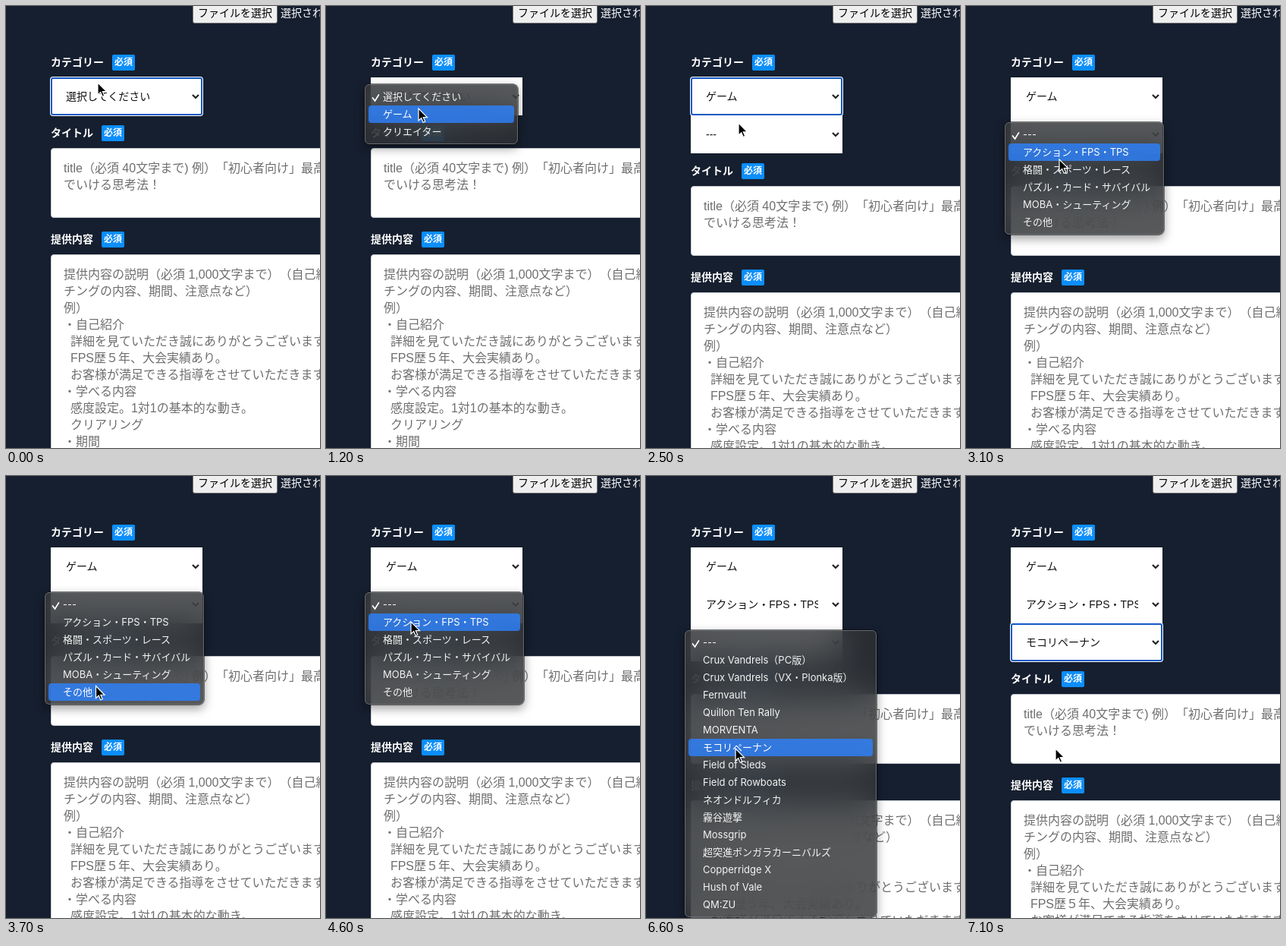
Recreate the animation shown at these times as an HTML page. Size 414 by 582 pixels, loop 7200 ms.

```html
<!DOCTYPE html>
<html lang="ja">
<head>
<meta charset="utf-8">
<style>
html, body { margin: 0; width: 100%; height: 100%; overflow: hidden; background: #161f2f; }
#stage {
  position: relative; width: 414px; height: 582px; overflow: hidden; background: #161f2f;
  font: 14px/20px 'Liberation Sans', 'Noto Sans CJK JP', sans-serif; text-spacing-trim: space-all;
}
#stage * { box-sizing: border-box; white-space: pre; }
#stage > *, #lower > * { position: absolute; }
.file { left: 246px; top: -5px; width: 112px; height: 28px; padding-top: 3px; text-align: center;
  background: #efefef; border: 1px solid #767676; border-radius: 3px; color: #000; }
.status { left: 362px; top: -1px; color: #fff; }
.label { left: 59px; color: #fff; font-weight: bold; }
.label b { display: inline-block; width: 30px; height: 21px; margin-left: 11px; vertical-align: top;
  background: #0c8efb; border-radius: 2px; font-size: 12px; line-height: 21px; text-align: center; }
.select { left: 59px; width: 200px; height: 50px; padding: 15px 0 0 20px; background: #fff; color: #111; }
.select span { display: block; width: 148px; overflow: hidden; }
.select svg { position: absolute; left: 185px; top: 21px; }
.focus { border-radius: 3px; box-shadow: 0 0 0 1px #fff, inset 0 0 0 2px #1259c3; }
#lower { left: 0; top: 0; }
.area { left: 59px; width: 420px; padding: 15px 16px; background: #fff; border: 1px solid #c6cbd1;
  border-radius: 4px; color: #6e6e6e; font-size: 16px; line-height: 22px; }
.menu { left: 51px; padding: 4px; border: 1px solid #686b70; border-radius: 6px; color: #f4f4f4;
  background: rgba(46, 48, 50, .8); backdrop-filter: blur(24px);
  box-shadow: 0 0 0 .5px #000, 0 5px 14px rgba(0, 0, 0, .4);
  font: 13px/23px Inter, 'Noto Sans CJK JP', sans-serif; }
.menu div { height: 23px; padding-left: 19px; border-radius: 4px; overflow: hidden; }
.menu .on { background: rgba(46, 126, 245, .85); color: #fff; }
.menu svg { position: absolute; left: 8px; top: 11px; }
#cursor { left: 0; top: 0; overflow: visible; }
</style>
</head>
<body>
<div id="stage">
  <div class="file">ファイルを選択</div>
  <div class="status">選択されていません</div>
  <div class="label" style="top:64px">カテゴリー<b>必須</b></div>
  <div id="lower">
    <div class="label" style="top:157px">タイトル<b>必須</b></div>
    <div class="area" style="top:187px;height:92px">title（必須 40文字まで) 例）「初心者向け」最高
でいける思考法！</div>
    <div class="label" style="top:297px">提供内容<b>必須</b></div>
    <div class="area" style="top:327px;height:400px">提供内容の説明（必須 1,000文字まで）（自己紹介
チングの内容、期間、注意点など）
例）
・自己紹介
  詳細を見ていただき誠にありがとうございます
  FPS歴５年、大会実績あり。
  お客様が満足できる指導をさせていただきます
・学べる内容
  感度設定。1対1の基本的な動き。
  クリアリング
・期間</div>
  </div>
</div>
<script>
const LOOP = 7200, ROW = 23;
const stage = document.getElementById('stage'), lower = document.getElementById('lower');

// open/close: menu visibility; shown: when the select joins the form
const fields = [
  { shown: 0, open: 500, close: 2200, width: 202, pick: 1,
    items: ['選択してください', 'ゲーム', 'クリエイター'] },
  { shown: 2300, open: 2800, close: 4800, width: 210, pick: 1,
    items: ['---', 'アクション・FPS・TPS', '格闘・スポーツ・レース', 'パズル・カード・サバイバル',
      'MOBA・シューティング', 'その他'] },
  { shown: 4900, open: 5200, close: 6800, width: 253, pick: 6,
    items: ['---', 'Crux Vandrels（PC版）', 'Crux Vandrels（VX・Plonka版）', 'Fernvault',
      'Quillon Ten Rally', 'MORVENTA', 'モコリペーナン', 'Field of Sleds', 'Field of Rowboats',
      'ネオンドルフィカ', '霧谷遊撃', 'Mossgrip', '超突進ポンガラカーニバルズ', 'Copperridge X',
      'Hush of Vale', 'QM:ZU'] }
];

// Pointer stops: time, x, y
const path = [[0, 121, 101], [400, 121, 102], [800, 122, 114], [1200, 122, 135], [2300, 122, 135],
  [2700, 122, 173], [2850, 122, 175], [3100, 123, 202], [3300, 123, 202], [3800, 118, 285],
  [4400, 112, 192], [4800, 112, 192], [5150, 116, 229], [5500, 116, 229], [6500, 118, 359], [LOOP, 118, 359]];

function add(html) {
  stage.insertAdjacentHTML('beforeend', html);
  return stage.lastElementChild;
}

fields.forEach((f, i) => {
  f.select = add(`<div class="select" style="top:${94 + 50 * i}px"><span></span>
    <svg width="12" height="8"><path d="M2 2l4 4 4-4" fill="none" stroke="#222" stroke-width="2.2"/></svg></div>`);
  f.text = f.select.firstChild;
});
fields.forEach((f, i) => {
  f.top = 103 + 50 * i;
  f.menu = add(`<div class="menu" style="top:${f.top}px;width:${f.width}px;z-index:2">${
    f.items.map(s => `<div>${s}</div>`).join('')
  }<svg width="11" height="12"><path d="M1.5 6l3 4 5-8" fill="none" stroke="#fff" stroke-width="1.7" stroke-linecap="round"/></svg></div>`);
});
const cursor = add(`<svg id="cursor" width="14" height="20" style="z-index:3"><path
  d="M0 0V16L3.7 12.6 6.2 18.3 8.7 17.2 6.3 11.7H11.5Z" fill="#000" stroke="#fff" stroke-width="1.2"/></svg>`);

function pointerAt(t) {
  const i = path.findIndex(p => p[0] > t);
  const [t0, x0, y0] = path[i - 1], [t1, x1, y1] = path[i];
  const u = (t - t0) / (t1 - t0), e = u * u * (3 - 2 * u);
  return [x0 + (x1 - x0) * e, y0 + (y1 - y0) * e];
}

function draw(t) {
  const [x, y] = pointerAt(t);
  const count = fields.filter(f => t >= f.shown).length;
  const menuOpen = fields.some(f => t >= f.open && t < f.close);
  cursor.style.transform = `translate(${x}px,${y}px)`;
  lower.style.transform = `translateY(${50 * (count - 1)}px)`;
  fields.forEach((f, i) => {
    const open = t >= f.open && t < f.close;
    const row = Math.max(0, Math.min(f.items.length - 1, Math.floor((y - f.top - 5) / ROW)));
    const focused = !menuOpen && (i === 0 || t >= f.close) && !(fields[i + 1] && t >= fields[i + 1].close);
    f.select.style.display = i < count ? '' : 'none';
    f.select.style.zIndex = focused ? 1 : 0;
    f.select.classList.toggle('focus', focused);
    f.text.textContent = f.items[t >= f.close ? f.pick : 0];
    f.menu.style.display = open ? '' : 'none';
    f.items.forEach((_, k) => f.menu.children[k].classList.toggle('on', k === row));
  });
}

const start = performance.now();
function frame() {
  draw((performance.now() - start) % LOOP);
  requestAnimationFrame(frame);
}
frame();
</script>
</body>
</html>
```
